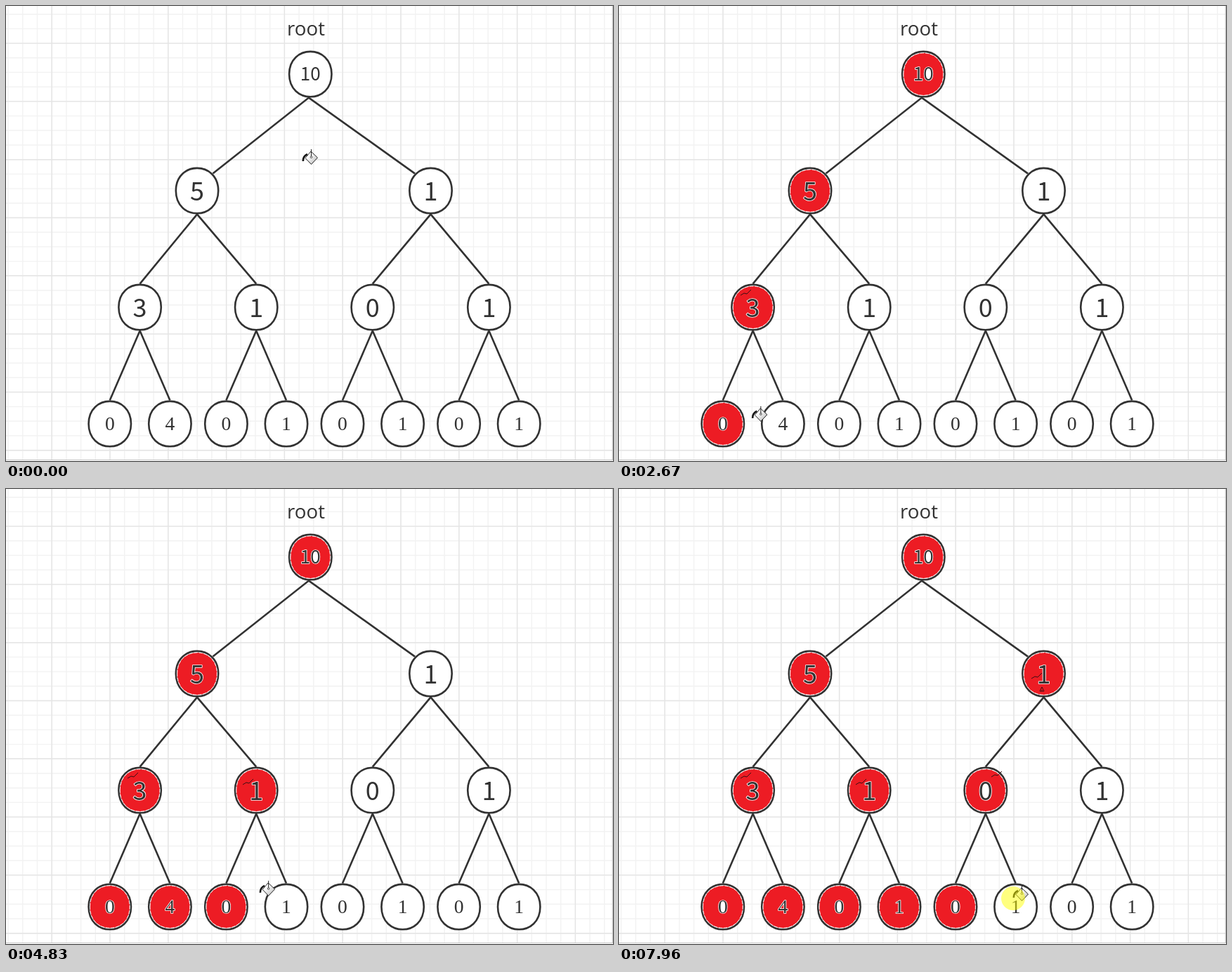
An HTML page that plays this animation: 864x648 px, repeating every 8 s.

```html
<!DOCTYPE html>
<html lang="en">
<head>
<meta charset="utf-8">
<title>Tree traversal</title>
<style>
  html, body { margin: 0; width: 100%; height: 100%; overflow: hidden; background: #fff; }
  svg { display: block; width: 864px; height: 648px; }
  text { fill: #323232; text-anchor: middle; }
  .label { font: 27.6px "Open Sans", "Noto Sans", sans-serif; }
  .root { font: 26px "Noto Sans CJK SC", "Noto Sans CJK JP", "Noto Sans", sans-serif; }
  .inner { font: 36px "Noto Sans CJK SC", "Noto Sans CJK JP", "Noto Sans", sans-serif; }
  .leaf { font: 27.6px "Liberation Serif", serif; }
  .ring { fill: #fff; stroke: #323232; stroke-width: 2.6; }
  .edge { fill: none; stroke: #323232; stroke-width: 2.6; }
  .border { fill: none; stroke: #c4c4c4; stroke-width: 1.2; }
  .paint { visibility: hidden; }
  .paint .body { fill: #ed1c24; stroke: #fff; stroke-width: .9; stroke-dasharray: 5 2; }
  .paint .hole { fill: #fff; }
  .paint .mark { fill: none; stroke: #3a1013; }
  .halo { stroke: #fff; stroke-width: 1.7; stroke-linejoin: round; paint-order: stroke; }
</style>
</head>
<body>
<svg viewBox="0 0 864 648">
  <defs>
    <linearGradient id="metal" x1="0" y1="0" x2="1" y2="1">
      <stop offset=".3" stop-color="#fff"/>
      <stop offset="1" stop-color="#b4b4b4"/>
    </linearGradient>
  </defs>
  <g id="grid"></g>
  <path class="border" d="M0 646.5H863.4V0"/>
  <text class="label" x="427" y="42">root</text>
  <g id="edges"></g>
  <g id="nodes"></g>
  <g id="cursor">
    <path d="M12 -15L21.5 -6L12.5 3.5L4 -5.5Z" fill="url(#metal)" stroke="#222"/>
    <path d="M12.5 -18V-8" stroke="#222"/>
    <circle cx="12.5" cy="-6.8" r="1.3" fill="#fff" stroke="#222" stroke-width=".8"/>
    <path d="M.8 -1Q.5 -8 7 -11" fill="none" stroke="#161616" stroke-width="2.6"/>
    <circle id="disc" r="17" fill="#ff0" opacity=".5"/>
  </g>
</svg>
<script>
const LOOP = 8000, TICK = 40, PRESS = 60;
const $ = id => document.getElementById(id);

function add(parent, tag, attrs, text = "") {
  const el = document.createElementNS("http://www.w3.org/2000/svg", tag);
  for (const k in attrs) el.setAttribute(k, attrs[k]);
  el.textContent = text;
  return parent.appendChild(el);
}

function lines(gap, stroke) {
  let d = "";
  for (let x = 65.2 % gap; x < 864; x += gap) d += `M${x} 0V646`;
  for (let y = 53.1 % gap; y < 646; y += gap) d += `M0 ${y}H864`;
  add($("grid"), "path", { d, stroke, "stroke-width": 1.4 });
}
lines(20.7, "#f2f2f2");
lines(82.8, "#e5e5e5");

function oval(x, y, w, h) {
  const l = x - w / 2, r = x + w / 2, c = h * 2 / 3;
  return `M${l} ${y}C${l} ${y - c} ${r} ${y - c} ${r} ${y}C${r} ${y + c} ${l} ${y + c} ${l} ${y}Z`;
}

// Node values and pointer visits, both in preorder
const values = "10 5 3 0 4 1 0 1 1 0 0 1 1 0 1".split(" ");
const STREAK = "m0 -9l5 -3l4 1l6 -6", BLOT = "m-3 26l3 -6l3 6zm2 -1h2";

// Leave time, arrival time, x, y, mark left in the paint
const visits = [
  [150, 500, 449, 112],
  [620, 1290, 258, 265],
  [1390, 1760, 173, 421, STREAK],
  [1900, 2300, 124, 585],
  [2500, 2800, 233, 590],
  [2900, 3850, 337, 430, STREAK],
  [4100, 4420, 308, 586],
  [4500, 5060, 392, 570],
  [5200, 5810, 587, 279, STREAK + BLOT],
  [6050, 6490, 530, 419, STREAK],
  [6800, 7045, 480, 568],
  [7500, 7900, 561, 583]
];

const styles = {
  root: { drop: 9.3, rx: 5, ry: 8.5, shift: 7.2 },
  inner: { drop: 13.4, rx: 7, ry: 12, shift: 0 },
  leaf: { drop: 9.2, rx: 5, ry: 8.5, shift: 0 }
};
const paints = [];
let count = 0;

function paint(x, y, text, style, [, , px, py, mark]) {
  const s = styles[style];
  const g = add($("nodes"), "g", { class: "paint" });
  add(g, "path", { class: "body", d: oval(x, y, 56.8, 60.4) });
  if (text.endsWith("0"))
    add(g, "ellipse", { class: "hole", cx: x + s.shift, cy: y, rx: s.rx, ry: s.ry });
  add(g, "text", { class: style + " halo", x, y: y + s.drop }, text);
  if (mark) add(g, "path", { class: "mark", d: `M${px} ${py}` + mark });
  paints.push(g);
}

function nodeX(depth, k) {
  if (depth === 0) return 433.3;
  if (depth === 1) return 272 + 332.5 * k;
  if (depth === 2) return 190.6 + 165.6 * k;
  return nodeX(2, k >> 1) + (k % 2 ? 42.8 : -42.8);
}
const nodeY = depth => 97.1 + 166 * depth;

function grow(depth, k) {
  const x = nodeX(depth, k), y = nodeY(depth), i = count++;
  const style = depth === 0 ? "root" : depth < 3 ? "inner" : "leaf";
  add($("nodes"), "path", { class: "ring", d: oval(x, y, 60.4, 64.4) });
  add($("nodes"), "text", { class: style, x, y: y + styles[style].drop }, values[i]);
  if (visits[i]) paint(x, y, values[i], style, visits[i]);
  if (depth === 3) return;

  // The wide top edges meet their nodes at the shoulder
  const top = depth === 0, inset = top ? 22.5 : 0;
  const foot = nodeY(depth + 1) - (top ? 24.5 : 33.5);
  const left = nodeX(depth + 1, 2 * k) + inset, right = nodeX(depth + 1, 2 * k + 1) - inset;
  const apex = top ? x - 2.3 : x;
  add($("edges"), "path", {
    class: "edge", d: `M${left} ${foot}L${apex} ${y + 33.5}L${right} ${foot}`
  });
  grow(depth + 1, 2 * k);
  grow(depth + 1, 2 * k + 1);
}
grow(0, 0);

function pointer(t) {
  let x = 422, y = 222;
  for (const [leave, arrive, nx, ny] of visits) {
    const u = Math.min(1, Math.max(0, (t - leave) / (arrive - leave)));
    const e = u * u * (3 - 2 * u);
    x += (nx - x) * e;
    y += (ny - y) * e;
  }
  return `translate(${x.toFixed(2)} ${y.toFixed(2)})`;
}

function show(el, on) {
  el.style.visibility = on ? "visible" : "hidden";
}

function draw(t) {
  const held = visits.map(v => t - v[1] - PRESS);
  $("cursor").setAttribute("transform", pointer(t));
  show($("disc"), held.some(h => h >= 0 && h < TICK));
  paints.forEach((g, i) => show(g, held[i] >= TICK));
}

let t0;
function tick(now) {
  t0 ??= now;
  draw((now - t0) % LOOP);
  requestAnimationFrame(tick);
}
draw(0);
requestAnimationFrame(tick);
</script>
</body>
</html>
```
